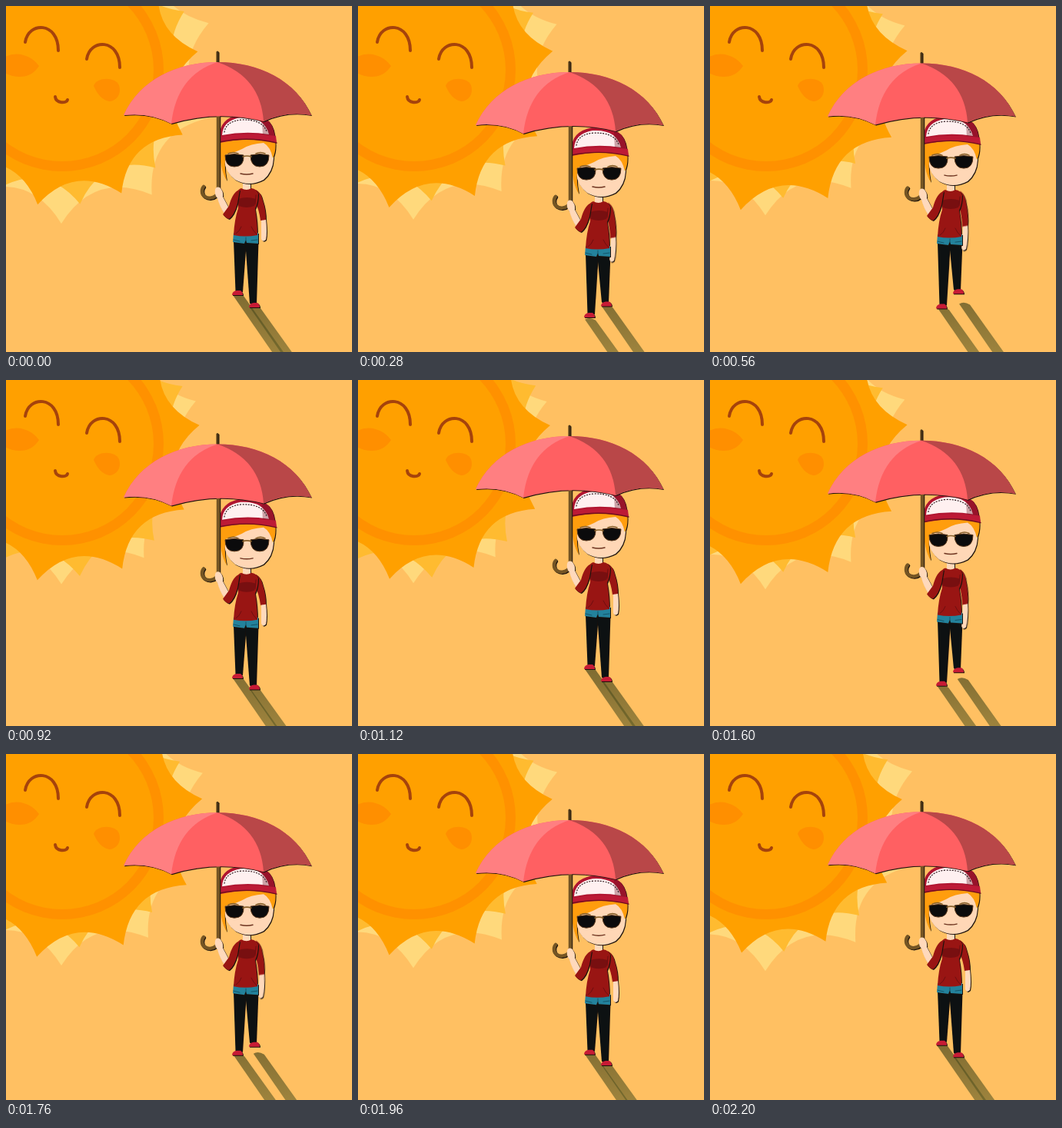
Recreate the animation shown at these times as an HTML page. Size 450x450 px, loop 2.24 s.

```html
<!DOCTYPE html>
<html lang="en">
<head>
<meta charset="utf-8">
<title>Sunny walk</title>
<style>
  html, body { margin: 0; width: 100%; height: 100%; overflow: hidden; background: #ffc062; }
  svg { display: block; width: 100vw; height: 100vh; }
  .rim { filter: drop-shadow(1.8px 1.6px 0 #1b120c); }
  .line { fill: none; stroke-linecap: round; stroke-linejoin: round; }
</style>
</head>
<body>
<svg viewBox="0 0 450 450">
  <defs>
    <linearGradient id="shade" gradientUnits="userSpaceOnUse" x1="0" y1="375" x2="0" y2="450">
      <stop offset="0" stop-color="#4d4a1e" stop-opacity=".72"/>
      <stop offset="1" stop-color="#5c5a24" stop-opacity=".6"/>
    </linearGradient>
  </defs>
  <rect width="450" height="450" fill="#ffc062"/>

  <g id="sun">
    <path id="raysPale" fill="#ffd97c"/>
    <path id="raysMid" fill="#ffbb30"/>
    <path id="raysFront" fill="#ffa000"/>
    <circle cx="73" cy="83" r="132" fill="#ff9100"/>
    <circle cx="73" cy="83" r="119" fill="#ffa000"/>
    <path fill="#ff8f00" d="M-3 67Q10 60 23 64Q35 67 43 78Q34 92 18 92Q6 92-3 86Z"/>
    <path fill="#ff8f00" d="M114 104C118 92 142 92 147 103C151 116 142 124 134 124C124 122 118 113 114 104Z"/>
    <g class="line" stroke="#a5430c" stroke-width="4">
      <path d="M25 47C29 20 68 20 68 58"/>
      <path d="M105 69C109 42 148 42 148 80"/>
      <path d="M64 118C65 127 79 127 80 122"/>
    </g>
  </g>

  <g fill="url(#shade)">
    <path id="shadowL"/>
    <path id="shadowR"/>
  </g>

  <g class="rim">
    <path id="legL" fill="#0d1112"/>
    <path id="legR" fill="#0d1112"/>
    <path id="shoeL" fill="#c71b35" d="M-7 2Q-7-3-1-4L4-4Q7-2 7 2Z"/>
    <path id="shoeR" fill="#c71b35" d="M-7 2Q-7-3-1-4L4-4Q7-2 7 2Z"/>
  </g>

  <g id="body">
    <g id="swingArm" class="rim">
      <path fill="#ffd9bb" d="M332 277L338 277Q340 295 338 304Q334 308 332 303Z"/>
      <path fill="#991513" d="M325 239Q332 243 334 253Q338 265 338 278L331 279Q329 264 324 255Z"/>
    </g>
    <g class="rim">
      <path fill="#23829c" d="M296 295H328L328 309L313 308L312 304L310 309L295 307Z"/>
      <path fill="#ffd9bb" d="M308 228H318V240Q313 244 308 240Z"/>
      <path fill="#991513" d="M306 237Q313 241 319 237Q326 238 328 244Q328 256 324 264Q327 280 327 298Q311 301 296 298Q297 278 302 263L300 246Q301 238 306 237Z"/>
    </g>
    <path fill="#780f10" d="M302 251Q313 247 325 251L323 260Q313 264 303 260Z"/>
    <path class="line" stroke="#6d0e10" d="M299 296Q304 293 306 287M326 297Q321 292 319 287M325 246L324 258"/>
    <path class="line" stroke="#145468" d="M296 304L304 306M312 301V305M319 305L327 304"/>
  </g>

  <g id="head">
    <g class="rim">
      <path fill="#ffd7b6" d="M284 172H348V198Q347 216 335 226Q316 236 298 226Q285 216 284 200Z"/>
      <path fill="#ff9d0d" d="M278 172H350Q352 188 347 198Q344 183 335 178Q318 179 307 186Q294 192 286 193Q283 207 287 227Q276 209 278 172Z"/>
      <path fill="#b01530" d="M278 174Q275 147 304 141Q329 138 342 150Q350 159 350 177Q315 170 278 178Z"/>
    </g>
    <path fill="#fff0f0" d="M281 168Q282 149 305 145Q336 143 342 167Q312 162 281 168Z"/>
    <path fill="#6b1020" fill-opacity=".35" d="M333 146Q350 150 350 174L334 171Z"/>
    <path class="line" stroke="#2b191e" stroke-width="1.2" stroke-dasharray="1 2.5" d="M284 164Q286 150 306 148Q333 147 339 163"/>
    <path fill="#bd1a36" d="M277 170Q314 164 351 169L352 178Q315 169 277 177Z"/>
    <path class="line" stroke="#6d0e1d" stroke-width="1.3" d="M277 177Q315 169 352 178"/>
    <g fill="#0b0b0c" stroke="#56351a" stroke-width="1">
      <path d="M285 194Q297 191 309 194Q310 209 297 209Q285 209 285 194Z"/>
      <path d="M318 194Q330 191 342 194Q342 209 330 209Q318 209 318 194Z"/>
      <path class="line" stroke="#87602a" stroke-width="1.6" d="M308 196Q313 194 319 196M289 192Q296 189 302 192M325 192Q331 189 337 192"/>
    </g>
    <path class="line" stroke="#6d3420" stroke-width="1.5" d="M305 218Q313 220 321 218"/>
  </g>

  <g id="umbrella">
    <g class="rim">
      <path class="line" stroke="#4a3516" stroke-width="3" stroke-linecap="butt" d="M275 60V76"/>
      <path class="line" stroke="#745524" stroke-width="4.5" d="M276 140V239C276 253 255 253 255 241Q255 237 257 235"/>
      <path fill="#ff6062" d="M153 142C174 96 222 73 275 73C329 73 376 96 397 142Q365 136 335 150Q275 135 215 153Q187 138 153 142Z"/>
    </g>
    <path fill="#ff7f81" d="M153 142C174 96 222 73 275 73Q222 90 215 153Q187 138 153 142Z"/>
    <path fill="#b94748" d="M275 73C329 73 376 96 397 142Q365 136 335 150Q331 92 275 73Z"/>
  </g>

  <g id="arm" class="rim">
    <path fill="#ffd9bb" d="M272 239Q273 234 278 236Q283 241 282 248L290 263L284 270Q278 261 275 250Q271 246 272 239Z"/>
    <path fill="#991513" d="M304 239L301 257Q297 272 290 277Q286 276 282 271L290 260Q295 241 304 239Z"/>
  </g>
</svg>

<script>
const LOOP = 2240, STEP = 40, DROP = 18.5;
const SUN = { x: 73, y: 83 };
const SHOULDER = { x: 327, y: 243 };
const STRIDES = [{ start: 0, length: 590 }, { start: 590, length: 530 }];
const el = id => document.getElementById(id);
const ease = u => (1 - Math.cos(Math.PI * u)) / 2;

// Linear interpolation through [time, value] stops.
function follow(t, stops) {
  const i = stops.findIndex(([time]) => time > t);
  const [t0, a] = stops[i - 1], [t1, b] = stops[i];
  return a + (b - a) * (t - t0) / (t1 - t0);
}

function sunPoint(radius, degrees) {
  const a = degrees * Math.PI / 180;
  return `${SUN.x + radius * Math.cos(a)} ${SUN.y + radius * Math.sin(a)}`;
}

// Ten points joined by inward curves.
function rays(radius, turn) {
  let d = `M${sunPoint(radius, turn)}`;
  for (let k = 0; k < 10; k++) {
    const a = turn + 36 * k;
    d += `Q${sunPoint(radius * 0.69, a + 18)} ${sunPoint(radius, a + 36)}`;
  }
  return d + 'Z';
}

// Height drop of the body and the balance between the two feet.
function walk(t) {
  const phase = t % 1120;
  const index = phase < STRIDES[1].start ? 0 : 1;
  const { start, length } = STRIDES[index];
  const u = (phase - start) / length;
  const fall = Math.min(u / 0.3, 1);
  const drop = u < 0.3 ? ease(fall) : Math.cos(Math.PI / 2 * (u - 0.3) / 0.7);
  const swap = 2 * ease(fall) - 1;
  return { drop, leftFront: index ? -swap : swap };
}

function castShadow(id, x, y) {
  const reach = (460 - y) * 0.69;
  el(id).setAttribute('d',
    `M${x - 7} ${y}Q${x - 1} ${y - 4} ${x + 7} ${y + 1}L${x + 8 + reach} 460H${x - 7 + reach}Z`);
}

function move(id, x, y) {
  el(id).setAttribute('transform', `translate(${x} ${y})`);
}

// Lengthens the free arm from the shoulder and draws it inwards.
function swingArm(amount) {
  const { x, y } = SHOULDER;
  const shear = -0.08 * amount, stretch = 1 + 0.16 * amount;
  el('swingArm').setAttribute('transform',
    `translate(${x} ${y}) matrix(1 0 ${shear} ${stretch} 0 0) translate(${-x} ${-y})`);
}

function draw(t) {
  const pulse = follow(t, [[0, 0], [540, 1], [1080, 0], [1620, 1], [LOOP, 0]]);
  const glow = follow(t, [[0, 1], [1050, 0], [LOOP, 1]]);
  el('raysFront').setAttribute('d', rays(178 + 7.5 * pulse, -7.7));
  el('raysMid').setAttribute('d', rays(176 - 8 * pulse, 10.4));
  el('raysPale').setAttribute('d', rays(180 + 20 * glow, 18.3));

  const { drop, leftFront } = walk(t);
  const y = DROP * drop;
  ['body', 'head', 'arm'].forEach(id => move(id, 0, y));
  move('umbrella', 0, 14 * drop);

  const leftShare = (1 + leftFront) / 2;
  swingArm(leftShare);

  const lift = leftShare * (1 - drop);
  const mid = 382 + 15 * drop, spread = (8 - drop) * leftFront;
  const left = mid + spread, right = mid - spread - 4 * lift;
  const hip = 305 + y;
  el('legL').setAttribute('d', `M296 ${hip}H312L307 ${left - 3}H298.500Z`);
  el('legR').setAttribute('d', `M311 ${hip}H327.500L325 ${right - 3}H317Z`);
  move('shoeL', 301, left);
  move('shoeR', 323, right);

  castShadow('shadowL', 302 + 2 * lift, left + 2 + 3 * leftShare * drop);
  castShadow('shadowR', 324 + 8 * lift, right + 2 + 15 * lift);
}

const origin = performance.now();
function tick() {
  const t = (performance.now() - origin) % LOOP;
  draw(Math.floor(t / STEP) * STEP);
  requestAnimationFrame(tick);
}
tick();
</script>
</body>
</html>
```
